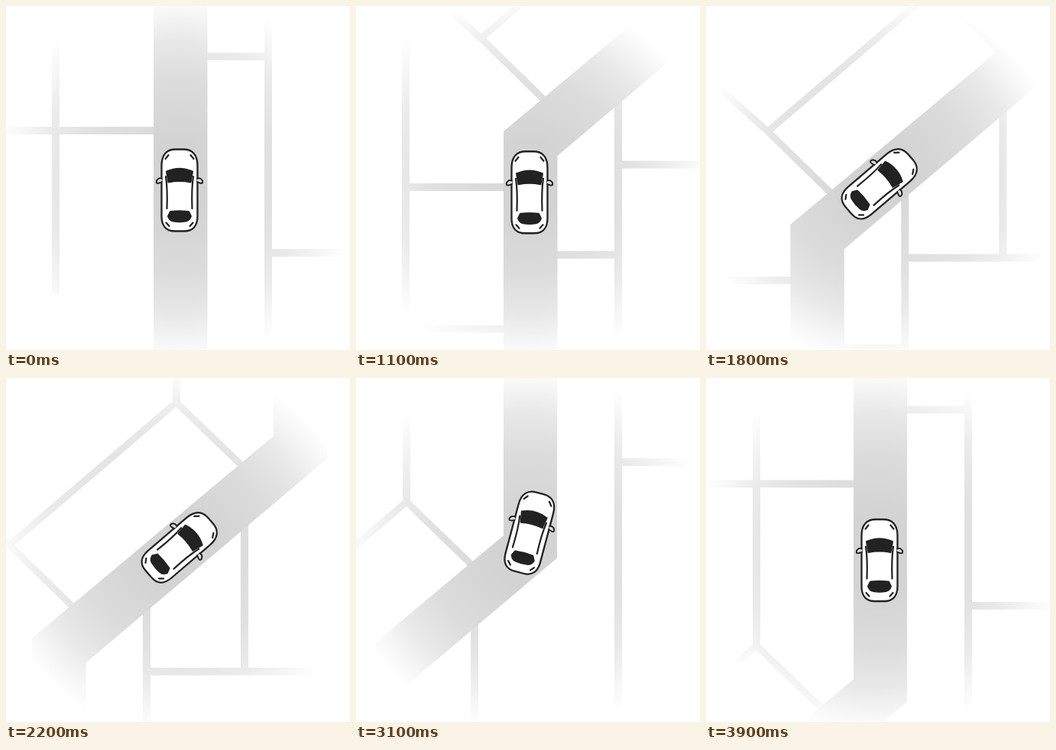
An HTML page that plays this animation: 450 by 450 pixels, repeating every 4000 ms.

```html
<!DOCTYPE html>
<html lang="en">
<head>
<meta charset="utf-8">
<title>Car on a map</title>
<style>
  html, body { margin: 0; height: 100%; overflow: hidden; background: #fff; }
  svg { display: block; width: 100vw; height: 100vh; }
</style>
</head>
<body>
<svg viewBox="0 0 450 450">
  <defs>
    <radialGradient id="fade" gradientUnits="userSpaceOnUse" cx="225" cy="225" r="242">
      <stop offset=".2" stop-color="#fff" stop-opacity="0"/>
      <stop offset=".54" stop-color="#fff" stop-opacity=".22"/>
      <stop offset=".74" stop-color="#fff" stop-opacity=".48"/>
      <stop offset=".89" stop-color="#fff" stop-opacity=".8"/>
      <stop offset="1" stop-color="#fff"/>
    </radialGradient>
    <g id="side">
      <path d="M-23-15C-27-17-31-13-30-10C-29-8-26-10-23-11" fill="#ddd" stroke-width="1.8"/>
      <path d="M-18-18Q-15.5-2-16.5 24" fill="none" stroke-width="2.2"/>
      <path d="M-18.5-41L-14.5-46M-17.5 42.5L-13.5 47" stroke-width="2.2"/>
    </g>
  </defs>

  <g id="map">
    <g fill="none" stroke="#d9d9d9" stroke-width="10" stroke-linejoin="round">
      <!-- first block -->
      <path d="M65 375V-308M-40 163H194M65-22.5H194"/>
      <path d="M343 600V-140M263 66H343M343 323H450M343-52H560M471-52V-250"/>
      <!-- diagonal lanes -->
      <path d="M62-308L163.5-217.5L249-134M163.5-217.5L382-404L469-320" stroke-width="9"/>
      <!-- last block -->
      <path d="M382-404V-1300M276-615.5H510"/>
      <path d="M659-100V-1300M579-712.5H659M659-456H790"/>
    </g>
    <path fill="#d3d3d3" d="M193 600V-95.5L509-360V-1300H579V-330.5L263.5-63.5V600Z"/>
  </g>

  <rect width="450" height="450" fill="url(#fade)"/>

  <g id="car" stroke="#222" stroke-linecap="round" stroke-linejoin="round">
    <use href="#side"/>
    <use href="#side" transform="scale(-1 1)"/>
    <path d="M-23.5-32C-23.5-47-16-53.5-5-53.5H5C16-53.5 23.5-47 23.5-32V34C23.5 47 17 53.5 6 53.5H-6C-17 53.5-23.5 47-23.5 34Z" fill="#fff" stroke-width="2.3"/>
    <use href="#side"/>
    <use href="#side" transform="scale(-1 1)"/>
    <path d="M-17-24.5Q0-32 17-24.5L14.5-10.5Q0-13.5-14.5-10.5ZM-12 28Q0 26.5 12 28L15 34Q13 40 8 40.5Q0 42-8 40.5Q-13 40-15 34Z" fill="#222" stroke-width="2"/>
  </g>
</svg>
<script>
const LOOP = 4000, STEP = 100, TURN = 49.5;
const map = document.getElementById('map');
const car = document.getElementById('car');

// time, map x, map y, car y
const route = [
  [0, 0, 0, 241],
  [1367, 0, 322.6, 244.4],
  [3022, -316, 547.7, 199],
  [3900, -316, 754, 238.5],
  [LOOP, -316, 778.5, 241]
];

function poseAt(t) {
  const i = route.findIndex(key => key[0] > t);
  const from = route[i - 1], to = route[i];
  const u = (t - from[0]) / (to[0] - from[0]);
  return from.map((v, k) => v + (to[k] - v) * u);
}

function smooth(start, end, t) {
  const u = Math.min(1, Math.max(0, (t - start) / (end - start)));
  return u * u * (3 - 2 * u);
}

function draw() {
  const t = Math.floor(performance.now() % LOOP / STEP) * STEP;
  const [, x, y, carY] = poseAt(t);
  const angle = TURN * (smooth(1220, 1510, t) - smooth(2890, 3220, t));
  map.setAttribute('transform', `translate(${x} ${y})`);
  car.setAttribute('transform', `translate(227 ${carY}) rotate(${angle})`);
  requestAnimationFrame(draw);
}
draw();
</script>
</body>
</html>
```
